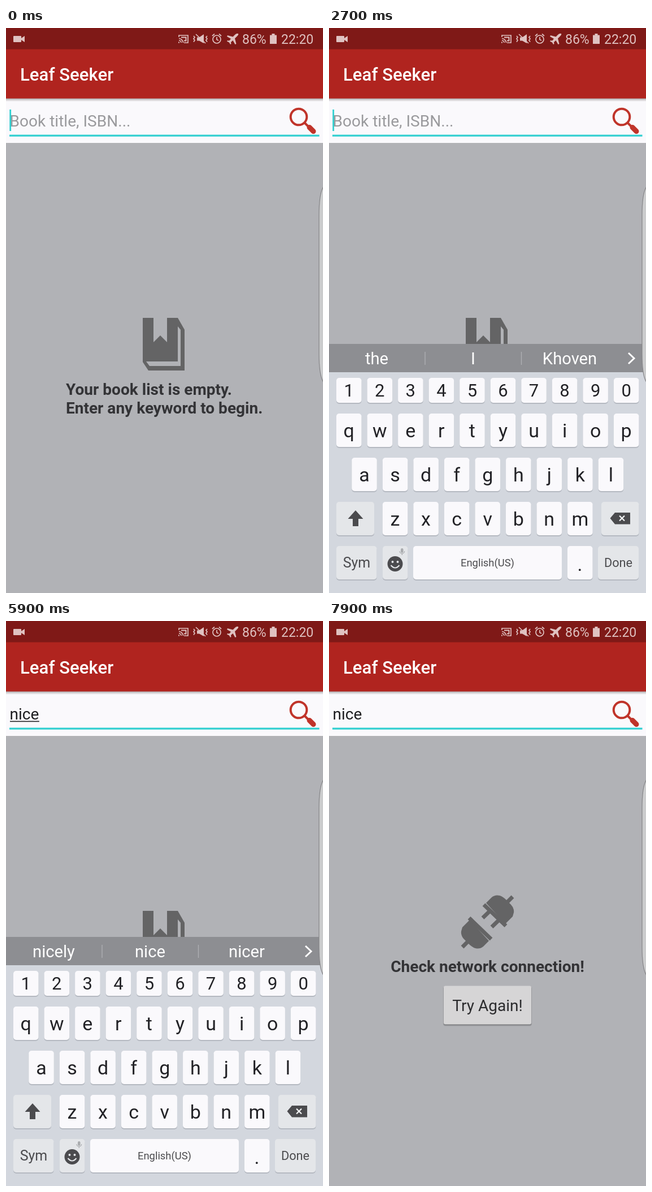
An HTML page for the animation above (8000 ms loop, 561 by 998 pixels).

```html
<!DOCTYPE html>
<html lang="en">
<head>
<meta charset="utf-8">
<title>Book search</title>
<style>
  html, body { margin: 0; width: 100%; height: 100%; overflow: hidden; background: #b1b2b6; }
  svg { display: block; width: 100vw; height: 100vh; font-family: Roboto, sans-serif; }
</style>
</head>
<body>
<svg viewBox="0 0 561 998" preserveAspectRatio="none">
  <defs>
    <linearGradient id="shade" x2="0" y2="1">
      <stop offset="0" stop-color="#000" stop-opacity=".32"/>
      <stop offset="1" stop-color="#000" stop-opacity="0"/>
    </linearGradient>
    <g id="plugBody">
      <path d="M278 498L288 488Q294 483 302 485Q306 486 312 491L322 501Q328 507 327 515L325 522L312 535Z"/>
      <path d="M274 501L313 538.500M314 498L325 487" stroke="#646465" stroke-width="7"/>
    </g>
  </defs>

  <rect width="561" height="998" fill="#b1b2b6"/>

  <g id="empty">
    <path fill="#646465" d="M242 512H304L316 533V605H252L242 590Z"/>
    <path fill="#b1b2b6" d="M261 512H285V555L273 543L261 555ZM304 527L309 533V597H254L248 589H304Z"/>
    <g font-size="28.05" font-weight="700" fill="#333336">
      <text x="106" y="648">Your book list is empty.</text>
      <text x="106" y="681">Enter any keyword to begin.</text>
    </g>
  </g>

  <g id="error">
    <g fill="#646465">
      <use href="#plugBody"/>
      <use href="#plugBody" transform="rotate(180 280.5 531.5)"/>
      <path d="M285 512L272 524.500M301 528L288 540.500" stroke="#646465" stroke-width="7"/>
    </g>
    <text x="280.500" y="620" font-size="28.05" font-weight="700" fill="#333336" text-anchor="middle">Check network connection!</text>
    <rect x="202" y="645.500" width="157" height="70" rx="4" fill="#000" opacity=".13"/>
    <rect x="203" y="646" width="155" height="68" rx="3" fill="#000" opacity=".2"/>
    <rect x="203" y="644.500" width="155" height="68" rx="3" fill="#d6d5d6"/>
    <text x="280.500" y="689" font-size="28.05" fill="#2c2c2e" text-anchor="middle">Try Again!</text>
  </g>

  <rect y="124" width="561" height="79" fill="#faf9fc"/>
  <rect y="124" width="561" height="6" fill="url(#shade)"/>
  <rect y="37" width="561" height="87.500" fill="#b0241f"/>
  <rect width="561" height="37.500" fill="#7f1917"/>
  <text x="25" y="93" font-size="31.17" font-weight="500" fill="#fff">Leaf Seeker</text>

  <g fill="#dfc2c1" font-size="23">
    <path d="M13 15q0-1 1-1H26q1 0 1 1V18L33 14V25L27 21V24q0 1-1 1H14q-1 0-1-1Z"/>
    <g fill="none" stroke="#dfc2c1" stroke-width="1.700">
      <path d="M306 16V13H322V26H315M306 18.500a8 8 0 0 1 7.500 7.500M306 22a4 4 0 0 1 4 4"/>
      <path d="M310 16.500H318.500V22.500H315" stroke-width="2"/>
      <path d="M332 14l2 2.500-2 2.500 2 2.500-2 3M356 14l-2 2.500 2 2.500-2 2.500 2 3M336 11L353 27"/>
      <circle cx="373" cy="20" r="7"/>
      <path d="M373 16V20.500L376 22M365 14L369 10.500M381 14L377 10.500"/>
    </g>
    <path d="M338 16.500H342L350 11V27L342 22.500H338ZM305 24.500h2v2h-2Z"/>
    <path d="M411 10Q408 9 405 12L401.500 15.500L392 13L391 15L398 19L395 22.500L392 22L391 23.500L395 25.500L397 29L398.500 28L398 25L401.500 22L405.500 29L407.500 28L405 18.500L408.500 15Q412 12 411 10Z"/>
    <text x="418" y="28">86%</text>
    <path d="M467 12.500H470.500V10H475.500V12.500H479V28H467Z"/>
    <text x="487" y="28">22:20</text>
  </g>

  <text id="hint" x="6.500" y="174" font-size="28.05" fill="#9a9a9d">Book title, ISBN...</text>
  <text id="typed" x="6.500" y="174" font-size="28.05" fill="#1e1e20"></text>
  <rect id="underline" x="7" y="176.500" height="1.700" fill="#2a2a2c"/>
  <rect id="cursor" y="144" width="2.800" height="38" fill="#30d0d0"/>
  <rect x="6" y="188.500" width="548.500" height="3.200" fill="#2fcfd0"/>
  <g fill="none" stroke="#c0342a">
    <circle cx="518" cy="157" r="14.300" stroke-width="4"/>
    <path d="M528 167L537 176" stroke-width="4"/>
    <path d="M537 175.500L544 182.500" stroke-width="9" stroke-linecap="round"/>
  </g>

  <g id="keyboard"></g>
  <path d="M562 280Q554 292 554 330V576Q554 614 562 626Z" fill="#cbcccd" stroke="#858588" stroke-width="1.200"/>
</svg>

<script>
const LOOP = 8000, STEP = 100, PITCH = 54.55;
const $ = id => document.getElementById(id);

const label = (x, y, size, text, fill = '#222226') =>
  `<text x="${x}" y="${y}" font-size="${size}" fill="${fill}" text-anchor="middle">${text}</text>`;

const keyBox = (x, y, w, h, fill = '#faf9fc', name = '') =>
  `<rect x="${x}" y="${y + 2}" width="${w}" height="${h}" rx="5" fill="#b5b9c1"/>
   <rect x="${x}" y="${y}" width="${w}" height="${h}" rx="5" fill="${fill}" data-key="${name}"/>`;

const keyRow = (chars, x, y, h, baseline, size) => [...chars].map((c, i) => {
  const left = x + i * PITCH;
  return keyBox(left, y, 44.5, h, '#faf9fc', c) + label(left + 22.2, baseline, size, c);
}).join('');

const GREY = '#e4e6e9', INK = '#4b4b4e';
$('keyboard').innerHTML = `
  <rect y="558" width="561" height="50" fill="#8d8e92"/>
  <rect y="608" width="561" height="392" fill="#d3d7de"/>
  <path d="M170 572V595M340.500 572V595" stroke="#b0b1b4" stroke-width="1.300"/>
  <path d="M530 574L540 583.500L530 593" fill="none" stroke="#fff" stroke-width="3"/>
  <g id="words">${[84.5, 255, 426].map(x => label(x, 594, 29.2, '', '#fff')).join('')}</g>
  ${keyRow('1234567890', 13, 618, 44, 651, 31)}
  ${keyRow('qwertyuiop', 13, 681, 59, 723, 34)}
  ${keyRow('asdfghjkl', 40.3, 759, 59, 801, 34)}
  ${keyRow('zxcvbnm', 94.8, 837, 59, 879, 34)}
  ${keyBox(13, 837, 67, 59, GREY)}${keyBox(482, 837, 66.500, 59, GREY)}
  <path d="M47 852L60.500 867H52V880H42V867H33.500Z" fill="${INK}"/>
  <path d="M497.500 866L506 856H533V876.500H506Z" fill="${INK}"/>
  <path d="M514 861.500L523 870.500M523 861.500L514 870.500" stroke="#f4f5f6" stroke-width="2.200"/>
  ${keyBox(13, 915, 71.500, 59, GREY)}${label(49, 953, 25, 'Sym', INK)}
  ${keyBox(95, 915, 44.500, 59, GREY)}
  <circle cx="117" cy="946.500" r="13.500" fill="${INK}"/>
  <g fill="${GREY}"><circle cx="112.500" cy="943" r="2"/><circle cx="121.500" cy="943" r="2"/></g>
  <path d="M109.500 949Q117 958 124.500 949" fill="none" stroke="${GREY}" stroke-width="2"/>
  <rect x="127" y="919" width="4.500" height="8" rx="2.200" fill="#a9abae"/>
  <path d="M125 924a4.300 4.300 0 0 0 8.600 0M129.300 928V931" fill="none" stroke="#a9abae" stroke-width="1.200"/>
  ${keyBox(149, 915, 263, 59)}${label(280.5, 951, 18.4, 'English(US)', INK)}
  ${keyBox(422, 915, 44.500, 59)}${label(444, 959, 34, '.')}
  ${keyBox(476, 915, 72, 59, GREY)}${label(512, 952, 21.7, 'Done', INK)}`;

// Each table lists [start ms, value...]; the last started entry applies.
const TYPED = [[0, ''], [3700, 'n'], [4400, 'ni'], [4900, 'nic'], [5400, 'nice']];
const PRESSED = [[0, ''], [3600, 'n'], [3700, ''], [4300, 'i'], [4400, ''],
  [4800, 'c'], [4900, ''], [5300, 'e'], [5400, '']];
const WORDS = [[0, 'the I Khoven'], [4100, 'not no now'], [4500, 'night nice nine'], [5700, 'nicely nice nicer']];
const SLIDE = [[0, 0, 0], [700, 150, .1], [800, 70, .4], [900, 22, .75], [1000, 6, .92], [1100, 1, .99],
  [1200, 0, 1], [6500, 3, 1], [6600, 11.5, .995], [6700, 45, .8], [6800, 100, .35], [6900, 0, 0]];
const BLINK_FROM = [[0, -300], [3700, 3700], [4400, 4400], [4900, 4900], [5400, 5400]];
const ERROR_AT = 6400;

const current = (table, t) => table.filter(row => row[0] <= t).pop();
const show = (id, on) => $(id).setAttribute('visibility', on ? 'visible' : 'hidden');

const typed = $('typed'), keyboard = $('keyboard');
const words = [...$('words').children];
const keys = [...keyboard.querySelectorAll('[data-key]')].filter(k => 'nice'.includes(k.dataset.key) && k.dataset.key);

function draw(t) {
  const text = current(TYPED, t)[1];
  typed.textContent = text;
  const width = text ? typed.getComputedTextLength() : 0;
  $('underline').setAttribute('width', width);
  $('cursor').setAttribute('x', 6.3 + width);
  show('hint', !text);
  show('underline', text && t < ERROR_AT);
  show('cursor', Math.floor((t - current(BLINK_FROM, t)[1]) / 500) % 2 === 0);
  show('empty', t < ERROR_AT);
  show('error', t >= ERROR_AT);

  const pressed = current(PRESSED, t)[1];
  keys.forEach(k => k.setAttribute('fill', k.dataset.key === pressed ? '#c3c8d0' : '#faf9fc'));
  current(WORDS, t)[1].split(' ').forEach((w, i) => { words[i].textContent = w; });

  const [, offset, alpha] = current(SLIDE, t);
  keyboard.setAttribute('transform', `translate(0 ${offset})`);
  keyboard.setAttribute('opacity', alpha);
}

function tick() {
  draw(Math.floor(performance.now() % LOOP / STEP) * STEP);
  requestAnimationFrame(tick);
}
tick();
</script>
</body>
</html>
```
